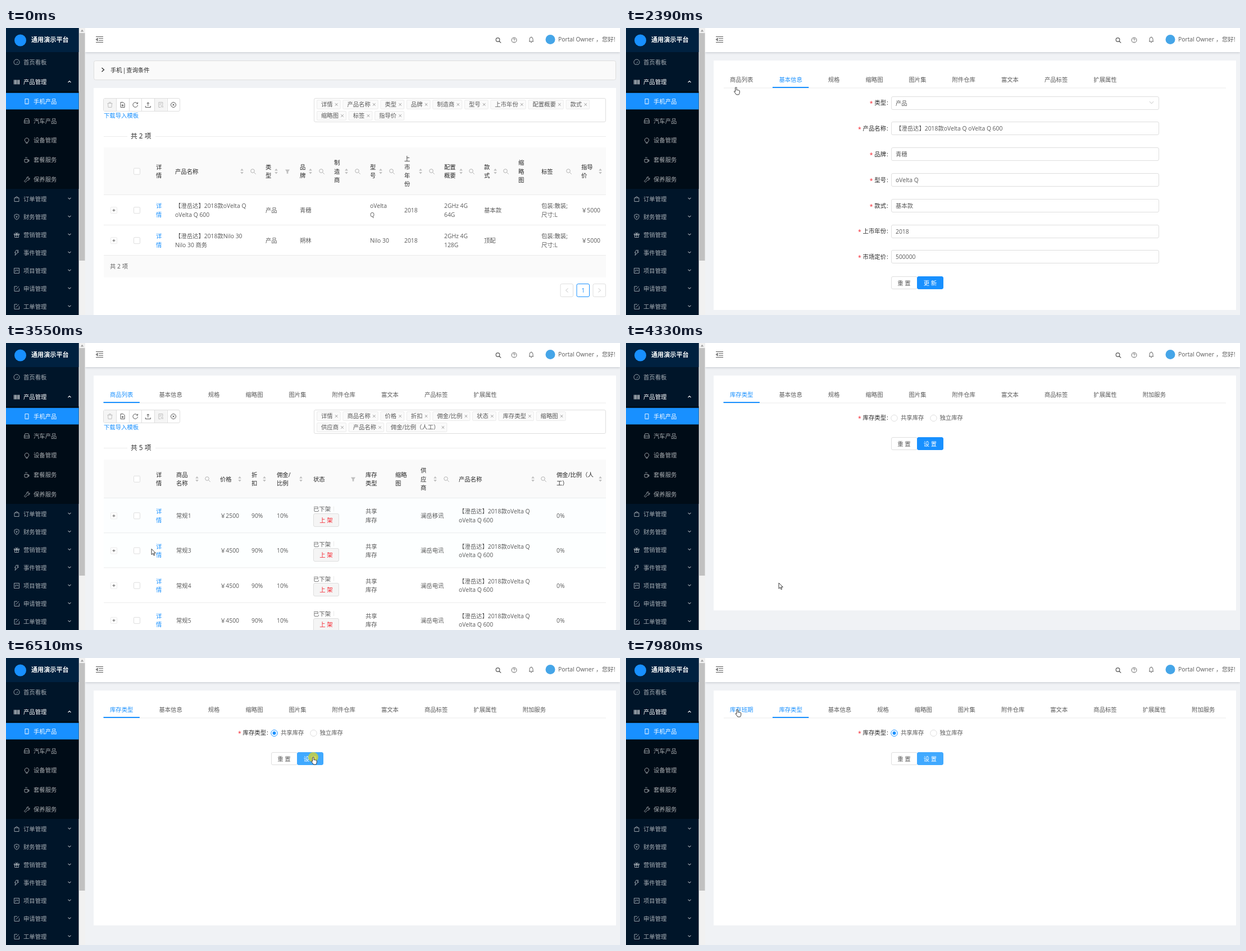
These frames come from a looping animation (1093 by 512 pixels, 8 s). An HTML page with a canvas:

```html
<!DOCTYPE html>
<html lang="zh">
<head>
<meta charset="utf-8">
<style>
html, body { margin: 0; width: 100%; height: 100%; overflow: hidden; background: #f0f2f5; }
canvas { display: block; }
</style>
</head>
<body>
<canvas id="stage" width="1093" height="512"></canvas>
<script>
const ctx = document.getElementById('stage').getContext('2d');
const LOOP = 8000, SIZE = 10.35;
const INK = 'rgba(0,0,0,.85)', BODY = 'rgba(0,0,0,.65)', BLUE = '#1890ff', HOVER_BLUE = '#40a9ff';
const LINE = '#ebebeb', BORDER = '#dedede', PALE = '#fafafa', MUTED = '#bfbfbf';
const SIDE_TEXT = 'rgba(255,255,255,.65)';

const icons = {
  gauge: 'M-3 3.5a5 5 0 1 1 6 0zM0 1l2-2.5',
  bars: 'M-4.5-4v8M-2.5-4v8M-1-4v8M1-4v8M3-4v8M4.5-4v8',
  phone: 'M-3-4.5h6v9h-6zM-.5 3h1',
  car: 'M-4.5 4v-4l1.5-4h6l1.5 4v4zM-4.5 0h9M-3 2h1.5M1.5 2h1.5',
  bulb: 'M-2 2.5a3.7 3.7 0 1 1 4 0v1h-4zM-1.5 5h3',
  cup: 'M-4-1h6v3.5q0 2-2 2h-2q-2 0-2-2zM2 0h2v2.5h-2M-2-5v2M0-5v2',
  wrench: 'M-4.5 3l4-4a2.8 2.8 0 0 1 3.5-3.5l-1.5 2 1.5 1.5 2-1.5a2.8 2.8 0 0 1-3.5 3.5l-4 4z',
  bag: 'M-4-2h8v6.5h-8zM-2-2v-1q2-3 4 0v1',
  shield: 'M0-5l4 1.5v4q-1 3.5-4 4.5q-3-1-4-4.5v-4zM-1.5-2l1.5 2 1.5-2M0 0v2.5',
  gift: 'M-4.5-2h9v2h-9zM-3.5 0h7v4.5h-7zM0-2v6.5M-2-4.5l2 2.5 2-2.5',
  bolt: 'M-1-4.5h4l-2 3h2.5l-6.5 6 1.5-4.5h-2z',
  board: 'M-4.5-4.5h9v9h-9zM-2-2v4M0-2v2M2-2v3',
  edit: 'M1-4h-5v8.5h8.5v-5M-1.5 1.5l5.5-5.5',
  down: 'M-2.5-1.2l2.5 2.5 2.5-2.5',
  up: 'M-2.5 1.2l2.5-2.5 2.5 2.5',
  right: 'M-2-3.5l4 3.5-4 3.5',
  left: 'M2-3.5l-4 3.5 4 3.5',
  fold: 'M-6.5-5h13M-1.5-1.7h8M-1.5 1.7h8M-6.5 5h13M-3.5-2l-2.5 2 2.5 2z',
  search: 'M2.3-1a3.3 3.3 0 1 1-6.6 0a3.3 3.3 0 1 1 6.6 0M1.5 1.5l3.2 3.2',
  help: 'M4.5 0a4.5 4.5 0 1 1-9 0a4.5 4.5 0 1 1 9 0M-1.5-1q0-1.5 1.5-1.5t1.5 1.4q0 .9-1.5 1.6M0 2v1',
  bell: 'M-4 3.5h8M-3 3.5v-4q0-3.5 3-3.5t3 3.5v4M0-5v1M-1 5h2',
  trash: 'M-4.5-2.5h9M-1.5-2.5v-2h3v2M-3.5-2.5l.5 7h6l.5-7',
  add: 'M-3.5-4.5h4.5l2.5 2.5v6.5h-7zM-2 1h4M0-1v4',
  reload: 'M3.5-2.5a4.3 4.3 0 1 0 .8 3M4.3-4.5v2.5h-2.5',
  upload: 'M0 2v-6M-2-2l2-2.2 2 2.2M-4.5 2v2.5h9v-2.5',
  find: 'M3.5 0v-4.5h-7v9h3.5M-2-2h4M-2 0h2M4 2.5a1.5 1.5 0 1 1-3 0a1.5 1.5 0 1 1 3 0M3.5 3.5l1 1',
  cancel: 'M4.5 0a4.5 4.5 0 1 1-9 0a4.5 4.5 0 1 1 9 0M-1.7-1.7l3.4 3.4M1.7-1.7l-3.4 3.4',
  close: 'M-2.2-2.2l4.4 4.4M2.2-2.2l-4.4 4.4',
  plus: 'M-2.5 0h5M0-2.5v5',
  select: 'M-3.5-2l3.5 4 3.5-4',
  sortUp: 'M0-5.2l2.8 3.6h-5.6z',
  sortDown: 'M0 4.6l2.8-3.6h-5.6z',
  filter: 'M-4-3.5h8l-2.7 4v3.2h-2.6v-3.2z',
  arrow: 'M0 0v10.2l2.4-2.2 1.7 3.7 1.6-.7-1.7-3.6h3.3z',
  hand: 'M-1.4 1q0-1.2 1.2-1.2t1.2 1.2v4l1.2-.5 1.3.6 1.2-.1q1.6.4 1.5 2v2.3q-.3 2.2-1.4 3.7h-4.4q-2-3-4-5.5q.2-1.6 2.2-.1z'
};
for (const name in icons) icons[name] = new Path2D(icons[name]);

const clamp = v => Math.max(0, Math.min(1, v));
const fade = (t, from, to) => clamp((t - from) / 250) * (1 - clamp((t - to) / 250));
const within = (t, from, to) => t >= from && t < to;
const linkColor = k => `rgb(${89 - 65 * k},${89 + 55 * k},${89 + 166 * k})`;

function setFont(size = SIZE, weight = 400) {
  ctx.font = `${weight} ${size}px "Open Sans", "Noto Sans CJK SC", "Noto Sans CJK", sans-serif`;
}
function widthOf(str) { setFont(); return ctx.measureText(str).width; }
function text(str, x, y, color = BODY, { size, weight, align = 'left' } = {}) {
  setFont(size, weight);
  ctx.fillStyle = color;
  ctx.textAlign = align;
  ctx.fillText(str, x, y + 3.8);
}
function lines(str, x, y, color) {
  const parts = str.split('|');
  parts.forEach((part, i) => text(part, x, y + (i - (parts.length - 1) / 2) * 15.3, color));
}
function rect(x, y, w, h, color) { ctx.fillStyle = color; ctx.fillRect(x, y, w, h); }
function box(x, y, w, h, fill, stroke, radius = 2.5) {
  ctx.beginPath();
  ctx.roundRect(x + .5, y + .5, w - 1, h - 1, radius);
  ctx.fillStyle = fill; ctx.fill();
  ctx.lineWidth = 1; ctx.strokeStyle = stroke; ctx.stroke();
}
function circle(x, y, r, fill, stroke) {
  ctx.beginPath(); ctx.arc(x, y, r, 0, 7);
  ctx.fillStyle = fill; ctx.fill();
  if (stroke) { ctx.lineWidth = 1; ctx.strokeStyle = stroke; ctx.stroke(); }
}
function icon(name, x, y, color, { fill, width = .9 } = {}) {
  ctx.save();
  ctx.translate(x, y);
  if (fill) { ctx.fillStyle = fill; ctx.fill(icons[name]); }
  if (color) { ctx.lineWidth = width; ctx.strokeStyle = color; ctx.stroke(icons[name]); }
  ctx.restore();
}

function sidebar() {
  rect(129, 0, 12, 512, '#f1f1f1');
  rect(130.5, 9, 10, 406, '#c1c1c1');
  icon('sortUp', 135.5, 8, null, { fill: '#a3a3a3' });
  rect(0, 0, 129.5, 512, '#001529');
  rect(0, 0, 129.5, 43, '#002140');
  circle(25.5, 22, 10.5, BLUE);
  text('通用演示平台', 45, 21.5, '#fff', { size: 11.1, weight: 700 });
  rect(0, 113, 129.5, 174, '#000c17');
  rect(0, 115.8, 129.5, 29.5, BLUE);
  const entry = (name, label, x, y, color) => {
    icon(name, x, y, color);
    text(label, x + 12, y, color);
  };
  entry('gauge', '首页看板', 19, 61.5, SIDE_TEXT);
  entry('bars', '产品管理', 19, 96.5, '#fff');
  icon('up', 113, 96, '#fff', { width: 1.2 });
  [['phone', '手机产品'], ['car', '汽车产品'], ['bulb', '设备管理'], ['cup', '套餐服务'], ['wrench', '保养服务']]
    .forEach(([name, label], i) => entry(name, label, 37, 131 + i * 34.8, i ? SIDE_TEXT : '#fff'));
  [['bag', '订单'], ['shield', '财务'], ['gift', '营销'], ['bolt', '事件'], ['board', '项目'], ['edit', '申请'], ['edit', '工单']]
    .forEach(([name, label], i) => {
      const y = 305 + i * 32;
      entry(name, label + '管理', 19, y, SIDE_TEXT);
      icon('down', 113, y - 1, SIDE_TEXT, { width: 1.1 });
    });
}

function header() {
  ctx.save();
  ctx.shadowColor = 'rgba(0,21,41,.2)'; ctx.shadowBlur = 4; ctx.shadowOffsetY = 1;
  rect(141, 0, 952, 43, '#fff');
  ctx.restore();
  icon('fold', 166.5, 20.5, BODY, { width: 1.1 });
  icon('search', 876.5, 22, BODY, { width: 1.2 });
  icon('help', 904.5, 21.5, BODY);
  icon('bell', 935, 20.5, BODY);
  circle(969, 20.5, 8.5, '#45a5e8');
  text('Portal Owner', 983, 20.5);
  text('，', 1050, 20.5);
  text('您好!', 1061, 20.5);
}

function toolbar(y, tagRows, count) {
  box(173, y, 137, 24, '#fff', BORDER);
  ['trash', 'add', 'reload', 'upload', 'find', 'cancel'].forEach((name, i) => {
    const x = 173.5 + i * 22.6, disabled = i % 4 === 0;
    if (disabled) rect(x + .5, y + 1, 22, 22, '#f5f5f5');
    if (i) rect(Math.round(x), y, 1, 24, BORDER);
    icon(name, x + 11.5, y + 12, disabled ? MUTED : BODY, { width: 1 });
  });
  text('下载导入模板', 174, y + 31, BLUE);
  box(548, y, 520, 43, '#fff', BORDER);
  tagRows.forEach((row, r) => {
    let x = 553;
    for (const label of row.split(' ')) {
      const w = widthOf(label);
      box(x, y + 3 + r * 20, w + 22, 17, PALE, LINE, 1.5);
      text(label, x + 8, y + 11.5 + r * 20);
      icon('close', x + w + 14.5, y + 11.5 + r * 20, '#8c8c8c');
      x += w + 25.7;
    }
  });
  rect(174, y + 68, 42, 1, LINE);
  rect(266, y + 68, 802, 1, LINE);
  text(`共 ${count} 项`, 222, y + 68, INK, { size: 11.8, weight: 500 });
}

const checkbox = y => box(227, y - 6, 12, 12, '#fff', BORDER, 1.5);

// Column: [x, heading, sorter x, search x, filter x]
function tableHead(y, h, columns) {
  rect(174, y, 894, h, PALE);
  rect(174, y + h, 894, 1, LINE);
  const mid = y + h / 2 + .7;
  checkbox(mid);
  for (const [x, title, sorter, search, filter] of columns) {
    lines(title, x, mid, INK);
    if (sorter) for (const part of ['sortUp', 'sortDown']) icon(part, sorter, mid + .3, null, { fill: MUTED });
    if (search) icon('search', search, mid + .3, '#aaa');
    if (filter) icon('filter', filter, mid + .3, null, { fill: MUTED });
  }
}
function tableRow(y, h, columns, cells, glow) {
  rect(174, y, 894, h, `rgba(230,247,255,${glow})`);
  rect(174, y + h - .5, 894, 1, LINE);
  const mid = y + h / 2 + .7;
  box(186, mid - 6, 12, 12, '#fff', LINE, 1);
  icon('plus', 192, mid, '#555');
  checkbox(mid);
  cells.forEach((cell, i) => cell && lines(cell, columns[i][0], mid, i ? BODY : BLUE));
}

const PRODUCT = '【澄岳达】2018款oVelta Q';
const productColumns = [
  [267, '详|情'], [301, '产品名称', 420, 440], [462, '类|型', 481, 0, 501], [523, '品|牌', 542, 562],
  [584, '制|造|商', 606, 626], [648, '型|号', 667, 687], [709, '上|市|年|份', 738, 758],
  [780, '配置|概要', 810, 829], [851, '款|式', 871, 890], [912, '缩|略|图'], [953, '标签', 0, 1002], [1024, '指导|价', 1058]
];
const productRows = [
  ['详|情', PRODUCT + '|oVelta Q 600', '产品', '青穗', '', 'oVelta|Q', '2018', '2GHz 4G|64G', '基本款', '', '包装:散装;|尺寸:L', '￥5000'],
  ['详|情', '【澄岳达】2018款Nilo 30|Nilo 30 商务', '产品', '朔林', '', 'Nilo 30', '2018', '2GHz 4G|128G', '顶配', '', '包装:散装;|尺寸:L', '￥5000']
];
const goodsColumns = [
  [267, '详|情'], [303, '商品|名称', 340, 359], [381, '价格', 416], [437, '折|扣', 460], [482, '佣金/|比例', 525],
  [547, '状态', 0, 0, 618], [640, '库存|类型'], [693, '缩略|图'], [738, '供|应|商', 764, 784],
  [806, '产品名称', 938, 957], [980, '佣金/比例（人|工）', 1058]
];
const goods = [['常规1', '￥2500', '澜岳移讯'], ['常规3', '￥4500', '澜岳电讯'], ['常规4', '￥4500', '澜岳电讯'], ['常规5', '￥4500', '澜岳电讯']];

function productPage(t) {
  box(156, 58, 930, 35, PALE, BORDER, 3);
  icon('right', 172.5, 74.5, INK, { width: 1.2 });
  text('手机', 186, 75.5, INK);
  text('|', 210.5, 75.5, INK, { align: 'center' });
  text('查询条件', 214.3, 75.5, INK);
  rect(156, 107, 930, 405, '#fff');
  toolbar(125, ['详情 产品名称 类型 品牌 制造商 型号 上市年份 配置概要 款式', '缩略图 标签 指导价'], 2);
  tableHead(213, 84, productColumns);
  const glow = [fade(t, 690, 1500), fade(t, 520, 690)];
  productRows.forEach((cells, i) => tableRow(297.5 + i * 54, 54, productColumns, cells, glow[i]));
  rect(174, 406, 894, 39, PALE);
  text('共 2 项', 185, 425.5);
  [['left', 987], ['', 1016], ['right', 1045]].forEach(([name, x]) => {
    box(x - .5, 456, 23.5, 24, '#fff', name ? BORDER : BLUE);
    if (name) icon(name, x + 11.5, 468, MUTED);
    else text('1', x + 11.5, 468, BLUE, { weight: 500, align: 'center' });
  });
}

function tabPanel(height, labels, active, hover = 0) {
  rect(156, 58, 930, height, '#fff');
  rect(174, 106.5, 894, 1, LINE);
  let x = 185;
  labels.split(' ').forEach((label, i) => {
    const w = widthOf(label);
    text(label, x, 92, i === active ? BLUE : linkColor(i ? 0 : hover));
    if (i === active) rect(x - 11.5, 105, w + 23, 2, BLUE);
    x += w + 46;
  });
}
function formLabel(label, y) {
  text(label, 463, y, INK, { align: 'right' });
  text(':', 464, y, INK);
  text('*', 463 - widthOf(label) - 8.5, y + 1, '#f5222d');
}
function formButtons(y, action, color) {
  box(472, y, 47, 23, '#fff', BORDER);
  text('重 置', 495, y + 12, BODY, { align: 'center' });
  box(518, y, 47, 23, color, color);
  text(action, 541.5, y + 12, '#fff', { align: 'center' });
}

const PRODUCT_TABS = '商品列表 基本信息 规格 缩略图 图片集 附件仓库 富文本 产品标签 扩展属性';
const STOCK_TABS = '库存类型 基本信息 规格 缩略图 图片集 附件仓库 富文本 商品标签 扩展属性 附加服务';

function detailPage(t) {
  tabPanel(445, PRODUCT_TABS, 1, fade(t, 2400, LOOP));
  [['类型', '产品'], ['产品名称', PRODUCT + ' oVelta Q 600'], ['品牌', '青穗'], ['型号', 'oVelta Q'],
    ['款式', '基本款'], ['上市年份', '2018'], ['市场定价', '500000']].forEach(([label, value], i) => {
    const y = 133.5 + i * 45.8;
    formLabel(label, y);
    box(472, Math.round(y - 12), 477, 24, '#fff', BORDER);
    text(value, 480, y + .3);
  });
  icon('select', 935.5, 133, MUTED);
  formButtons(443, '更 新', BLUE);
}

function goodsPage(t) {
  tabPanel(454, PRODUCT_TABS, 0);
  if (t < 2860) return;
  toolbar(119, ['详情 商品名称 价格 折扣 佣金/比例 状态 库存类型 缩略图', '供应商 产品名称 佣金/比例（人工）'], 5);
  tableHead(208, 68, goodsColumns);
  const glow = [fade(t, 3280, 3330), fade(t, 3530, 3630), fade(t, 3630, LOOP), 0];
  goods.forEach(([name, price, vendor], i) => {
    const y = 276.5 + i * 62.2;
    tableRow(y, 62.2, goodsColumns,
      ['详|情', name, price, '90%', '10%', '', '共享|库存', '', vendor, PRODUCT + '|oVelta Q 600', '0%'], glow[i]);
    text('已下架', 547, y + 20);
    rect(583, y + 15, 1, 9, LINE);
    box(547, Math.round(y + 27.5), 46, 24, '#f5f5f5', BORDER);
    text('上 架', 570, y + 39.5, '#f5222d', { align: 'center' });
  });
}

function stockPage(t) {
  const saved = t >= 6750;
  tabPanel(419, (saved ? '库存班期 ' : '') + STOCK_TABS, saved ? 1 : 0, fade(t, 7680, LOOP));
  formLabel('库存类型', 133.5);
  const checked = t >= 5650;
  circle(477.5, 134, 5.7, '#fff', checked || within(t, 5420, 5650) ? BLUE : BORDER);
  if (checked) circle(477.5, 134, 3, BLUE);
  circle(547.5, 134, 5.7, '#fff', BORDER);
  text('共享库存', 489, 133.5);
  text('独立库存', 558.5, 133.5);
  formButtons(168, '设 置', t >= 6250 ? HOVER_BLUE : BLUE);
}

// Pointer path: [time, x, y]
const path = [
  [290, 990, 515], [450, 800, 430], [700, 430, 345], [1000, 289, 322.5], [1100, 272, 319], [2010, 272, 319],
  [2390, 196, 106], [2560, 197, 92], [3080, 197, 92], [3550, 259, 367], [3720, 272, 428], [4720, 272, 428],
  [5120, 410, 240], [5480, 502, 136], [5800, 502, 136], [6050, 583, 146], [6340, 547, 177], [6750, 547, 177],
  [7430, 280, 132], [7760, 206, 99], [7980, 198.5, 92], [LOOP, 198.5, 92]
];
const overLink = [[1050, 1400], [2370, 3100], [3680, 4000], [5420, 5830], [6200, 6850], [7680, LOOP]];
const clicks = [[1220, 1380], [2600, 2760], [3790, 3950], [5570, 5730], [6510, 6670]];

function pointer(t) {
  if (t < path[0][0]) return;
  const i = path.findIndex(key => key[0] > t);
  const [t0, x0, y0] = path[i - 1], [t1, x1, y1] = path[i];
  const k = (t - t0) / (t1 - t0);
  const x = x0 + (x1 - x0) * k, y = y0 + (y1 - y0) * k;
  const during = spans => spans.some(([from, to]) => within(t, from, to));
  if (during(clicks)) circle(x, y, 9, 'rgba(225,215,30,.72)');
  icon(during(overLink) ? 'hand' : 'arrow', x, y, '#222', { fill: '#fff' });
}

function draw(t) {
  rect(0, 0, 1093, 512, '#f0f2f5');
  if (t < 1400) productPage(t);
  else if (t < 2760) detailPage(t);
  else if (t < 4000) goodsPage(t);
  else stockPage(t);
  header();
  sidebar();
  pointer(t);
}

const start = performance.now();
function tick() {
  draw((performance.now() - start) % LOOP);
  requestAnimationFrame(tick);
}
tick();
</script>
</body>
</html>
```
